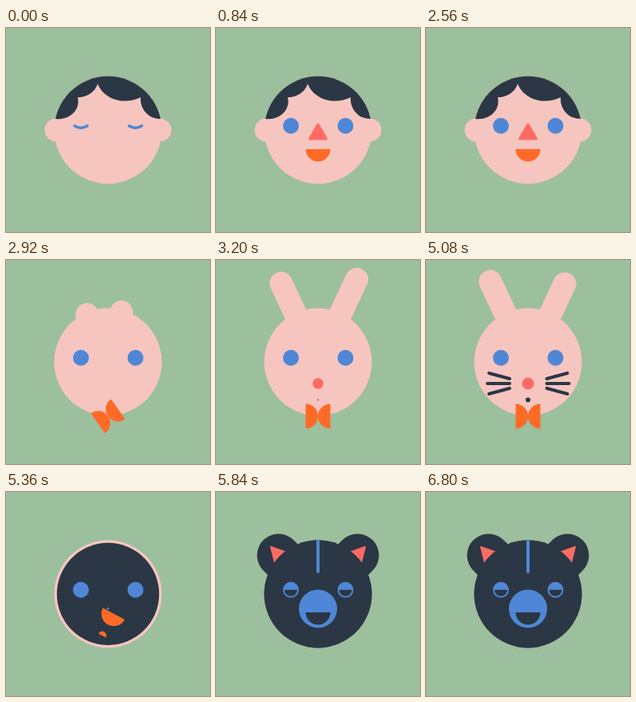
An HTML page for the animation above (8000 ms loop, 256x256 px).

```html
<!DOCTYPE html>
<html lang="en">
<head>
<meta charset="utf-8">
<title>Changing faces</title>
<style>
  html, body { margin: 0; height: 100%; overflow: hidden; background: #9cbf9d; }
  svg { display: block; width: 100vw; height: 100vh; }
  .navy { fill: #2b3745; }
  .blue { fill: #4f87d6; }
  .red { fill: #ff6b64; stroke: #ff6b64; stroke-linejoin: round; }
  .line { fill: none; stroke-linecap: round; }
</style>
</head>
<body>
<svg viewBox="0 0 256 256">
  <defs>
    <clipPath id="face"><circle cx="128" cy="128" r="67.5"/></clipPath>
    <path id="half" d="M0-15.5A15.5 15.5 0 0 0 0 15.5Z"/>
    <path id="whisk" d="M0-6L-26-13M0 0H-28M0 6L-26 13" class="line" stroke="#2b3745" stroke-width="4"/>
    <path id="tri" d="M-9.5-10.5L13-2.5L-3.5 13Z" class="red" stroke-width="2"/>
  </defs>
  <rect width="256" height="256" fill="#9cbf9d"/>
  <line id="earL" class="line"/>
  <line id="earR" class="line"/>
  <use id="triL" href="#tri"/>
  <use id="triR" href="#tri"/>
  <circle id="head" cx="128" cy="128" r="67.5"/>
  <circle id="fur" class="navy" cx="128" cy="128"/>
  <g clip-path="url(#face)">
    <path id="hair" class="navy" d="M55 114H62C78 116 94 104 90 87C102 87 112 80 115 70C122 88 146 98 169 87C168 102 179 114 194 114H200V50H55Z"/>
    <line id="stripe" x1="128" y1="56" x2="128" stroke="#4f87d6" stroke-width="4" class="line"/>
  </g>
  <g id="eyes"></g>
  <use id="whiskL" href="#whisk"/>
  <use id="whiskR" href="#whisk"/>
  <path id="nose" class="red" stroke-width="3" d="M0-9L10.5 9H-10.5Z"/>
  <circle id="snout" class="red" stroke="none" style="stroke:none" cx="128" cy="155"/>
  <circle id="dot" class="navy" cx="128" cy="175.5"/>
  <circle id="muzzle" class="blue" cx="128" cy="146.5"/>
  <g id="bow">
    <use id="bowL" href="#half"/>
    <use id="bowR" href="#half"/>
  </g>
</svg>
<script>
const LOOP = 8000, STEP = 40;
const PINK = '#f7c5c0', NAVY = '#2b3745';
const $ = id => document.getElementById(id);
const set = (id, attrs) => {
  for (const k in attrs) $(id).setAttribute(k, attrs[k]);
};

// Eased track through time, value pairs
function track(t, ...k) {
  if (t <= k[0]) return k[1];
  for (let i = 2; i < k.length; i += 2) {
    if (t < k[i]) {
      const u = (t - k[i - 2]) / (k[i] - k[i - 2]);
      return k[i - 1] + (k[i + 1] - k[i - 1]) * (1 - Math.cos(Math.PI * u)) / 2;
    }
  }
  return k[k.length - 1];
}

// Scale up past full size, then settle
const pop = (t, from, to, over = 1.12) =>
  track(t, from, 0, from + (to - from) * 0.6, over, to, 1);

const mix = (a, b, u) => `rgb(${a.map((v, i) => Math.round(v + (b[i] - v) * u))})`;
const place = (id, x, y, sx, sy = sx) => {
  set(id, {
    transform: `translate(${x} ${y}) scale(${sx} ${sy})`,
    visibility: Math.abs(sx) < 0.01 ? 'hidden' : 'visible'
  });
};

$('eyes').innerHTML = [94, 162.5].map(x => `<g transform="translate(${x} 122.8)">
  <ellipse class="blue" rx="10"/>
  <path class="line" d="M-8 0Q0 5.2 8 0" stroke="#4f87d6" stroke-width="3.5"/>
  <path class="navy" d="M-8 0A8 8 0 0 0 8 0Z"/></g>`).join('');

function drawEyes(t) {
  const closed = t < 40 || (t >= 1640 && t < 1920);
  const open = t < 1640
    ? track(t, 0, 0.25, 160, 1.26, 280, 1)
    : track(t, 1920, 0.65, 1960, 1.24, 2000, 1);
  const pupil = t < 6320
    ? track(t, 5560, 0, 5760, 1)
    : track(t, 6320, 1, 6440, 0, 6600, 0, 6800, 1);
  for (const eye of $('eyes').children) {
    const [ball, lid, dark] = eye.children;
    ball.setAttribute('ry', closed ? 0 : 10 * open);
    lid.setAttribute('visibility', closed ? 'visible' : 'hidden');
    dark.setAttribute('transform', `scale(1 ${pupil})`);
    dark.setAttribute('visibility', pupil < 0.01 ? 'hidden' : 'visible');
  }
}

// Ears slide round the head, grow outward, hide, then return round
function drawEar(t, side) {
  const left = side < 0, lag = left ? 80 : 0;
  const angle = t < 5080
    ? track(t, 2560 + lag, 0, 2920 + lag, 75, 3120 + lag, 64.9)
    : track(t, 5160, 64.9, 5400, 44.4);
  const start = left ? 2960 : 2920;
  let reach = t < 5040
    ? track(t, start, 65, start + 320, 116.5, 3520, 108.3)
    : left
      ? track(t, 5040, 108.3, 5120, 114.6, 5400, 45, 5640, 73, 5840, 69.3)
      : track(t, 5080, 108.3, 5160, 116.5, 5400, 45, 5640, 73, 5840, 69.3);
  if (!left && t > 6320 && t < 6800) {
    reach += 3 * Math.sin((t - 6320) / 480 * Math.PI * 3);
  }
  const width = track(t, 5400, 29, 5640, 62, 5840, 54);
  const a = angle * Math.PI / 180;
  const at = r => [128 + side * r * Math.cos(a), 128 - r * Math.sin(a)];
  const [x1, y1] = at(Math.min(48, reach - 2)), [x2, y2] = at(reach);
  const id = left ? 'L' : 'R';
  set('ear' + id, { x1, y1, x2, y2, 'stroke-width': width, stroke: t < 5400 ? PINK : NAVY });
  const s = pop(t, 5520, 5840);
  place('tri' + id, x2, y2, -side * s, s);
}

function drawMouth(t) {
  const y = t < 5080
    ? track(t, 2560, 167.5, 2880, 196)
    : track(t, 5080, 196, 5280, 166.5);
  const turn = t < 5080
    ? track(t, 2640, -90, 3130, 0)
    : track(t, 5160, 0, 5480, -90);
  const twin = t < 5080
    ? track(t, 2600, 0, 2800, 1)
    : track(t, 5240, 1, 5440, 0);
  set('bow', {
    transform: `translate(128 ${y}) rotate(${turn})`,
    fill: mix([255, 107, 38], [43, 55, 69], track(t, 5360, 0, 5560, 1))
  });
  place('bowL', -15.5, 0, -twin, twin);
  place('bowR', 15.5, 0, pop(t, 480, 840, 1.18));
}

function draw(t) {
  drawEar(t, -1);
  drawEar(t, 1);
  drawEyes(t);
  drawMouth(t);

  set('head', { fill: t < 5400 ? PINK : NAVY });
  set('fur', { r: track(t, 5120, 0, 5400, 67.5) });
  set('hair', {
    transform: `translate(0 ${track(t, 2560, 0, 2840, -62)})`,
    visibility: t < 2840 ? 'visible' : 'hidden'
  });
  set('stripe', {
    y2: track(t, 5520, 56, 5800, 100),
    visibility: t > 5520 ? 'visible' : 'hidden'
  });

  place('nose', 128, 130, t < 2560 ? pop(t, 240, 560) : track(t, 2560, 1, 2760, 0));
  set('snout', { r: 7.5 * (t < 5080 ? pop(t, 3080, 3360) : track(t, 5120, 1, 5360, 0)) });
  set('dot', { r: 3 * (t < 5080 ? pop(t, 3160, 3360) : track(t, 5080, 1, 5240, 0)) });
  set('muzzle', { r: 24 * pop(t, 5320, 5760, 1.08) });

  const w = t < 5080 ? pop(t, 3200, 3520) : track(t, 5080, 1, 5240, 0);
  place('whiskL', 105, 155, w);
  place('whiskR', 151.5, 155, -w, w);
}

const begin = performance.now();
function tick() {
  const t = (performance.now() - begin) % LOOP;
  draw(Math.floor(t / STEP) * STEP);
  requestAnimationFrame(tick);
}
tick();
</script>
</body>
</html>
```
